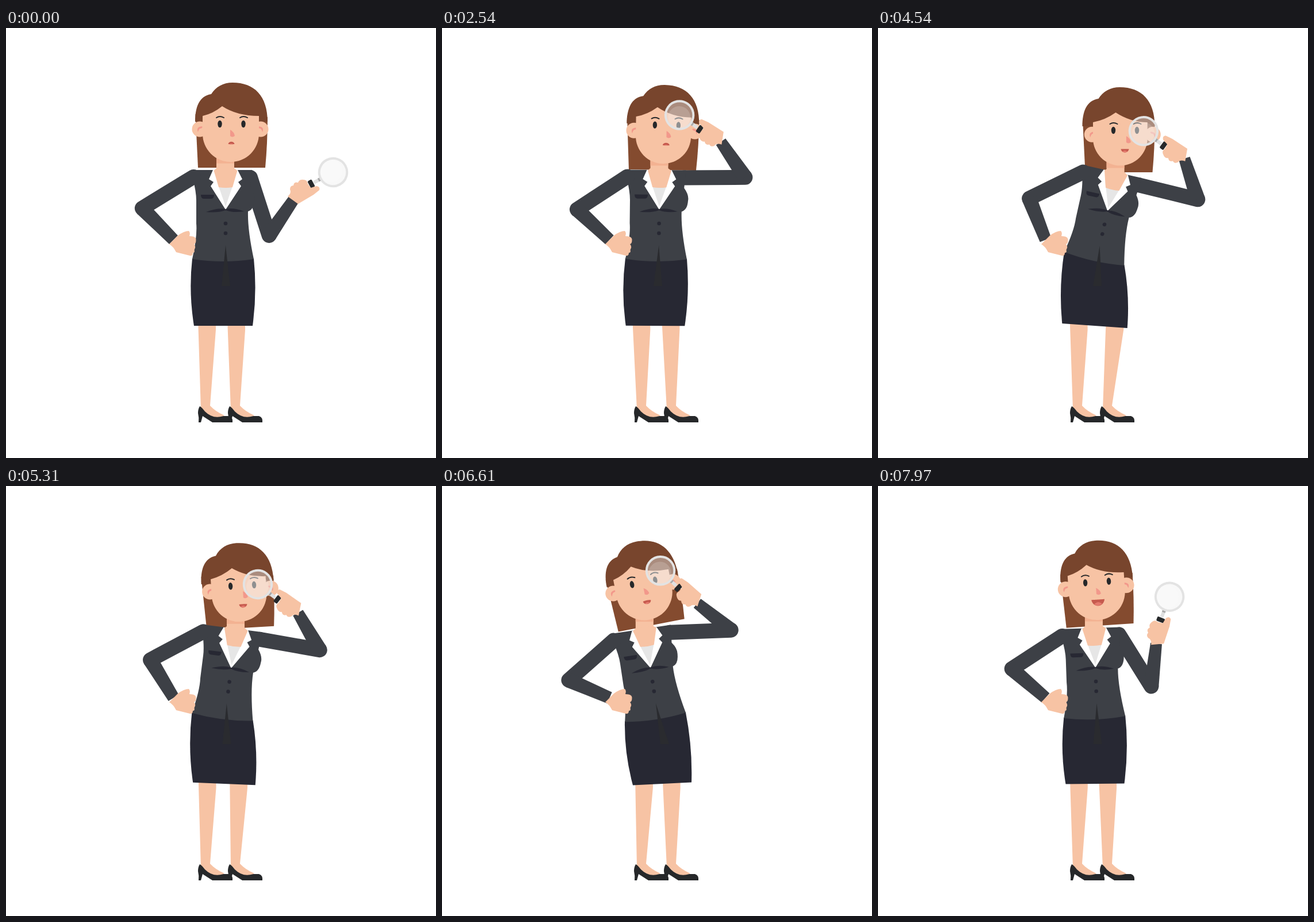
Animation of 748 by 748 pixels, one loop 8000 ms. Source, as an HTML page:

```html
<!DOCTYPE html>
<html lang="en">
<head>
<meta charset="utf-8">
<title>Woman with magnifying glass</title>
<style>
  html, body { margin: 0; width: 100%; height: 100%; overflow: hidden; background: #fff; }
  svg { display: block; width: 100vw; height: 100vh; }
</style>
</head>
<body>
<svg id="stage" viewBox="0 0 748 748"></svg>
<script>
const LOOP = 8000;
const SKIN = '#f7c3a4', JACKET = '#3d4046', SKIRT = '#272833', INK = '#26282a';
const CAP = '#78452d', HAIR = '#844b2f', PINK = '#f2988b';

// torso angle, torso dx, skirt dx, head x, y, angle, face turn x, y,
// mouth half width, rise, drop, right wrist x, y, hand angle
const rest  = [0, 0, 0, 392, 184, 0, 0, 0, 5.5, 4, .5, 500, 299, 0];
const peer  = [.3, -5, -7, 382.5, 185, 0, 11, -5, 8, 6, 1, 484, 196, -116];
const nod   = [.6, -5, -7, 384, 188, 1, 6, -2, 6, 4, .5, 485, 198, -117];
const tilt  = [4, 0, -.5, 406, 186, 7, -4.5, 1, 5.5, 4, .5, 509, 209, -122];
const right = [12.6, 0, -1, 418.5, 192, 0, 11, 3, 7, 0, 6, 533, 227, -116];
const mid   = [-.9, -1, 4.5, 380.5, 184, -8, 3, 1, 7, 1, 5.5, 471, 211, -112];
const left  = [-8.6, -7.5, 5, 352.5, 184.5, -11, 1, 0, 7, 1, 5.5, 444, 204, -108];
const smile = [-2, -1, -.5, 381.7, 184, -3.8, 0, 0, 11.5, 0, 11, 484, 274, -41];
const blend = (a, b, k) => a.map((v, i) => v + (b[i] - v) * k);

const keys = [
  [0, rest], [850, peer], [1800, peer], [2600, nod], [3350, nod], [3640, tilt],
  [4180, blend(right, mid, -.06)], [4540, right], [5000, blend(right, mid, .12)],
  [5810, mid], [6610, left], [7470, left], [7970, smile], [LOOP, smile]
];

// Smooth interpolation that never overshoots a key
function poseAt(t) {
  let i = 0;
  while (i < keys.length - 2 && t >= keys[i + 1][0]) i++;
  const span = keys[i + 1][0] - keys[i][0], u = (t - keys[i][0]) / span;
  return rest.map((_, p) => {
    const rate = j => keys[j + 1] && keys[j]
      ? (keys[j + 1][1][p] - keys[j][1][p]) / (keys[j + 1][0] - keys[j][0]) : 0;
    const slope = j => {
      const a = rate(j - 1), b = rate(j);
      return a * b > 0 ? 2 * a * b / (a + b) : 0;
    };
    const a = keys[i][1][p], b = keys[i + 1][1][p];
    const ease = u * u * (3 - 2 * u);
    return a + (b - a) * ease + span * u * (1 - u) * ((1 - u) * slope(i) - u * slope(i + 1));
  });
}

const path = (d, fill, extra = '') => `<path d="${d}" fill="${fill}" ${extra}/>`;
const line = (d, color, width) =>
  path(d, 'none', `stroke="${color}" stroke-width="${width}" stroke-linecap="round"`);
const circle = (x, y, r, fill, extra = '') =>
  `<circle cx="${x}" cy="${y}" r="${r}" fill="${fill}" ${extra}/>`;
const group = (transform, body) => `<g transform="${transform}">${body}</g>`;

// Two-bone arm with the elbow bent clockwise from the shoulder-wrist line
function arm([sx, sy], [wx, wy], upper, fore, cuff) {
  const dist = Math.min(Math.hypot(wx - sx, wy - sy), upper + fore - .1);
  const bend = Math.acos((upper ** 2 + dist ** 2 - fore ** 2) / (2 * upper * dist));
  const dir = Math.atan2(wy - sy, wx - sx) + bend;
  const ex = sx + upper * Math.cos(dir), ey = sy + upper * Math.sin(dir);
  const len = Math.hypot(wx - ex, wy - ey), nx = (ey - wy) / len, ny = (wx - ex) / len;
  return line(`M${sx},${sy}L${ex},${ey}`, JACKET, 26) +
    path(`M${ex + nx * 13},${ey + ny * 13}L${wx + nx * cuff},${wy + ny * cuff}
      L${wx - nx * cuff},${wy - ny * cuff}L${ex - nx * 13},${ey - ny * 13}Z`, JACKET);
}

function leg(x, dx) {
  return path(`M${x + dx},505H${x + dx + 31}L${x + 31 + dx * .95},525
    L${x + 21},657Q${x + 30},667 ${x + 46},674L${x + 30},680L${x + 5},664Z`, SKIN) +
    path(`M${x + 3},658Q${x + 6},659 ${x + 12},667Q${x + 26},681 ${x + 44},675
      H${x + 54}Q${x + 61},677 ${x + 60},686H${x + 25}L${x + 8},675L${x + 5},686
      H${x + 1}Q${x + 2},678 ${x},670Q${x},663 ${x + 3},658Z`, INK);
}

const torso =
  path(`M322,247H428L425,278Q434,290 432,300Q431,316 421,319Q420,350 431,402
    Q378,410 324,402Q333,362 331,340V300Q331,285 325,262Z`, JACKET) +
  path(`M360,247L353,263L361,268L356,275L382,316L409,275L404,268L411,263L403,247Z`, '#fff') +
  path('M370,274H394L382,309Z', '#e6e6e6', 'stroke="#e6e6e6"') +
  path('M366,244H397L402.500,248L394,277Q382,279 370,277L361.500,248Z', SKIN) +
  path('M339,290H362Q362,297 357,297H344Q339,297 339,290Z', SKIRT) +
  path('M348,320Q369,312 382,315Q396,312 414,319Q395,322 382,317Q368,322 348,320Z', SKIRT) +
  circle(382, 340, 3.3, SKIRT) + circle(382, 357, 3.3, SKIRT);

const leftHand = path(`M299,361Q310,353 318,353Q321,356 319,362Q331,362 330.500,369
  Q330.500,375 327,376Q331,380 327.500,386Q329,391 325,391Q325,397 320,396
  L296,390Q291,380 284,376Z`, SKIN);

const lens =
  `<rect x="-38" y="-3" width="13" height="6" fill="#e0e0e0"/>` +
  `<rect x="-29" y="-3" width="4" height="6" fill="#a9a9a9"/>` +
  `<rect x="-47" y="-7" width="8" height="14" rx="2" fill="${INK}"/>` +
  circle(0, 0, 24, '#eee', 'fill-opacity=".42"') +
  circle(-2, -3.5, 19.5, '#fff', 'fill-opacity=".16"') +
  circle(0, 0, 24.2, 'none', 'stroke="#e3e3e3" stroke-width="4"');

const rightHand = group('translate(-500 -299)',
  group('translate(569 251) rotate(-28)', lens) +
  path(`M490,293Q497,287 494,281Q494,274 500,274Q501,267 508,269Q510,263 518,264
    Q524,264 525,271L530,278L540,275Q547,276 545,282L535,290L508,306Z`, SKIN));

function face(turn, rise, mouthW, mouthUp, mouthDown, eyeOpen) {
  const y = rise, l = 342 + turn * .5, r = 440 + turn * .2, radius = (r - l) / 2;
  const ears = group(`translate(${turn * .8} ${rise * .4})`,
    circle(337, 176, 13.5, SKIN) + circle(443, 176, 13.5, SKIN) +
    path('M334,181Q330,172 341,171Q343,174 337,175Q335,177 334,181Z', PINK) +
    path('M446,181Q450,172 439,171Q437,174 443,175Q445,177 446,181Z', PINK));
  const skin = path(`M${l},${153 + y}Q${360 + turn * .8},${149 + y} ${376 + turn},${136 + y}
    Q${402 + turn},${153 + y} ${r},${153 + y}V184A${radius},${radius} 0 0 1 ${l},184Z`, SKIN);
  const eye = x => `<ellipse cx="${x}" cy="167" rx="3.7" ry="${.8 + 5.4 * eyeOpen}" fill="${INK}"/>`;
  const drop = mouthDown * 1.33, up = mouthUp * 1.33;
  const mouth = group(`translate(392 ${202 - mouthDown * .4})`,
    path(`M${-mouthW},0C${-mouthW * .8},${-up} ${mouthW * .8},${-up} ${mouthW},0
      C${mouthW * .8},${drop} ${-mouthW * .8},${drop} ${-mouthW},0Z`, '#c65a4e') +
    path(`M${-mouthW * .6},${mouthDown * .7}Q0,${mouthDown * .1 - mouthUp * .5} ${mouthW * .6},${mouthDown * .7}
      Q0,${mouthDown * 1.2} ${-mouthW * .6},${mouthDown * .7}Z`, '#e47a6e'));
  return ears + skin + group(`translate(${turn} ${rise})`,
    eye(372) + eye(413) +
    line('M366,156Q372,152 379,156', INK, 2) + line('M407,156Q413,152 420,156', INK, 2) +
    path('M390,177V188Q394,191 398,187.500Q397,181 390,177Z', PINK, `transform="translate(${turn * .4} 0)"`) +
    mouth);
}

function draw(t) {
  const [lean, shift, hip, hx, hy, headTurn, turn, rise, mw, mu, md, wx, wy, hand] = poseAt(t);
  const cos = Math.cos(lean * Math.PI / 180), sin = Math.sin(lean * Math.PI / 180);
  const onTorso = (x, y) => [
    380 + shift + (x - 380) * cos - (y - 395) * sin,
    395 + (x - 380) * sin + (y - 395) * cos
  ];
  const headFrame = `translate(${hx - 392} ${hy - 184}) rotate(${headTurn} 392 184)`;
  const eyeOpen = Math.min(1, Math.max(0, (Math.abs(t - 1370) - 30) / 60));

  // Skirt hangs between the jacket hem and a softer-tilting lower edge
  const [ax, ay] = onTorso(324, 401), [bx, by] = onTorso(431, 401);
  const half = 51 + Math.max(lean, 0) * .45, skew = Math.tan(lean * .33 * Math.PI / 180) * half;
  const sx = 378 + hip, lx = sx - half, rx = sx + half, ly = 518 - skew, ry = 518 + skew;
  const skirt = path(`M${ax},${ay}Q${(ax + lx) / 2 - 8},${(ay + ly) / 2} ${lx},${ly}
    L${rx},${ry}Q${(bx + rx) / 2 + 7},${(by + ry) / 2} ${bx},${by}Z`, SKIRT);
  const [tipX, tipY] = onTorso(382, 378);
  const slit = path(`M${tipX},${tipY}L${sx + 12},449H${sx - 3}Z`, '#2a2b2f');
  const rightLeg = hip * .4 - 1 + Math.max(lean - 5, 0) * 1.6 + Math.min(lean, 0) * .4;

  const [nx, ny] = onTorso(381.5, 250), chin = hy + 49;
  const neck = `<rect x="${nx - 15.5}" y="${ny - 40}" width="31" height="42" fill="${SKIN}"/>` +
    `<rect x="${nx - 15.5}" y="${chin - 20}" width="31" height="22.5" fill="#f3b292"/>`;

  // The hand sinks into the cuff as the wrist flexes
  const sink = -hand / 115 * 5;

  document.getElementById('stage').innerHTML =
    leg(334, hip * .4) + leg(386, rightLeg) + skirt +
    group(headFrame, path('M329.500,150L334,243H451Q455,200 455,155Z', HAIR)) +
    neck +
    arm(onTorso(425, 260), [wx, wy], 106, 75, 10) +
    group(`translate(${shift} 0) rotate(${lean} 380 395)`, torso) + slit +
    arm(onTorso(326, 259), [291.5, 368.5], 104.5, 77.5, 10.5) + leftHand +
    group(headFrame,
      path('M329,163C329,138 336,118 357,115C365,102 378,95 394,95C432,95 455,118 455,163Z', CAP) +
      face(turn, rise, mw, mu, md, eyeOpen)) +
    group(`translate(${wx} ${wy}) rotate(${hand}) translate(${sink} ${sink})`, rightHand);
}

const start = performance.now();
function tick() {
  draw((performance.now() - start) % LOOP);
  requestAnimationFrame(tick);
}
tick();
</script>
</body>
</html>
```
